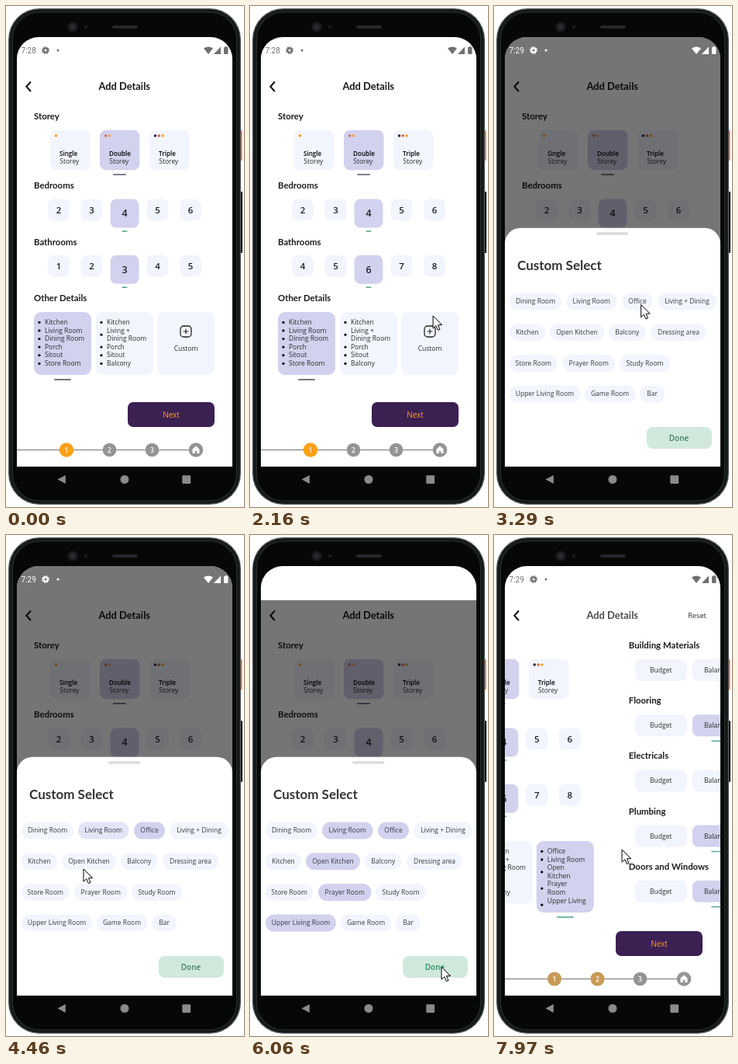
Write an HTML page with a canvas that moves like this. It is 307 by 645 pixels and loops after 8000 ms.

```html
<!DOCTYPE html>
<html lang="en">
<head>
<meta charset="utf-8">
<title>Add Details</title>
<style>
html, body { margin: 0; width: 100%; height: 100%; overflow: hidden; background: #fff; }
canvas { display: block; width: 307px; height: 645px; }
</style>
</head>
<body>
<canvas></canvas>
<script>
const LOOP = 8000;
const canvas = document.querySelector('canvas');
const ctx = canvas.getContext('2d');
const dpr = window.devicePixelRatio || 1;
canvas.width = 307 * dpr;
canvas.height = 645 * dpr;

const PALE = [242, 245, 253], LILAC = [210, 209, 238];
const ORANGE = [251, 160, 24], GRAY = [148, 148, 148];
const HEAD = '"Lato", sans-serif', BODY = '"Open Sans", sans-serif';

// Timing helpers
const clamp = v => Math.min(1, Math.max(0, v));
const lerp = (a, b, u) => a + (b - a) * u;
const smooth = u => u * u * (3 - 2 * u);
const mix = (a, b, u) => `rgb(${a.map((v, i) => Math.round(lerp(v, b[i], u)))})`;

function bezier(x1, y1, x2, y2) {
  const at = (s, a, b) => 3 * (1 - s) ** 2 * s * a + 3 * (1 - s) * s * s * b + s ** 3;
  return x => {
    let lo = 0, hi = 1;
    for (let i = 0; i < 20; i++) {
      const mid = (lo + hi) / 2;
      if (at(mid, x1, x2) < x) lo = mid; else hi = mid;
    }
    return at(hi, y1, y2);
  };
}
const decelerate = bezier(0, 0, .2, 1);
const ease = bezier(.25, .1, .25, 1);

// Keys are [time, ...values], eased between neighbours.
function track(keys, t) {
  if (t <= keys[0][0]) return keys[0].slice(1);
  const next = keys.findIndex(k => k[0] > t);
  if (next < 0) return keys[keys.length - 1].slice(1);
  const a = keys[next - 1], b = keys[next];
  const u = smooth((t - a[0]) / (b[0] - a[0]));
  return a.slice(1).map((v, i) => lerp(v, b[i + 1], u));
}

// Drawing helpers
function box(x, y, w, h, r, fill) {
  ctx.beginPath();
  ctx.roundRect(x, y, w, h, r);
  ctx.fillStyle = fill;
  ctx.fill();
}
function disc(x, y, r, fill) {
  ctx.beginPath();
  ctx.arc(x, y, r, 0, 7);
  ctx.fillStyle = fill;
  ctx.fill();
}
function shape(points, fill) {
  ctx.beginPath();
  points.forEach(p => ctx.lineTo(...p));
  ctx.closePath();
  ctx.fillStyle = fill;
  ctx.fill();
}
function line(points, color, width) {
  ctx.beginPath();
  points.forEach(p => ctx.lineTo(...p));
  ctx.strokeStyle = color;
  ctx.lineWidth = width;
  ctx.stroke();
}
function text(str, x, y, size = 8.5, { font = BODY, weight = 400, color = '#2b2b2b', align = 'left' } = {}) {
  ctx.font = `${weight} ${size}px ${font}`;
  ctx.textAlign = align;
  ctx.fillStyle = color;
  ctx.fillText(str, x, y);
}
const heading = (str, y) => text(str, 36, y, 11.4, { font: HEAD, weight: 700, color: '#1c1c1c' });
const underline = (cx, y, w, color) => box(cx - w / 2, y - .75, w, 1.5, .75, color);

function drawPhone() {
  box(300, 160, 4.5, 39, 1, '#e5663f');
  box(300, 239, 5, 79, 1, '#111');
  box(3, 3, 300, 639, 40, '#59605e');
  box(4.2, 4.2, 297.6, 636.6, 39, '#151918');
  box(8, 7.5, 290, 630, 35, '#2b302e');
  box(9, 8.5, 288, 628, 34, '#060707');
  disc(86, 27, 6.5, '#1b1c1e');
  disc(86, 27, 3, '#2b2c31');
  disc(103, 27, 2.5, '#161718');
  box(137, 25, 33, 4, 2, '#25282a');
  shape([[66.5, 609.5], [76.8, 604], [76.8, 615]], '#8a8a8a');
  disc(153, 609.5, 5.5, '#8a8a8a');
  box(227.3, 604.3, 10.8, 10.8, 1, '#8a8a8a');
}

function drawStatus(t, color) {
  text(t < 2500 ? '7:28' : '7:29', 19.5, 61, 10, { font: '"Roboto", sans-serif', color });
  ctx.strokeStyle = color;
  for (const [r, w, dash] of [[2.7, 2.2, []], [4.2, 1.4, [1.9, 1.4]]]) {
    ctx.beginPath();
    ctx.arc(51, 57, r, 0, 2 * Math.PI);
    ctx.lineWidth = w;
    ctx.setLineDash(dash);
    ctx.stroke();
  }
  ctx.setLineDash([]);
  disc(67, 57, 1.5, color);
  ctx.beginPath();
  ctx.moveTo(261, 62);
  ctx.lineTo(255, 54.5);
  ctx.quadraticCurveTo(261, 50.5, 267, 54.5);
  ctx.fillStyle = color;
  ctx.fill();
  shape([[268, 62], [277, 62], [277, 52.5]], color);
  box(281, 53, 5.5, 9, 1, color);
  box(282.6, 52, 2.3, 2, 0, color);
}

function drawStorey() {
  const options = [
    ['Single', 57, ['#f9a11b']],
    ['Double', 121, ['#c9705c', '#f0a24a']],
    ['Triple', 185, ['#35203f', '#d0673f', '#f9a11b']]
  ];
  heading('Storey', 146);
  for (const [name, x, dots] of options) {
    box(x, 159.7, 51.5, 51.5, 8, mix(PALE, LILAC, name === 'Double' ? 1 : 0));
    dots.forEach((c, i) => disc(x + 7.5 + i * 4.8, 167, 1.8, c));
    text(name, x + 12, 193, 8.1, { weight: 600, color: '#000' });
    text('Storey', x + 12.3, 203);
  }
  underline(146.5, 217, 17, '#55556e');
}

function drawPicker(top, first, last, center, active) {
  ctx.save();
  ctx.beginPath();
  ctx.rect(52, top - 4, 202, 50);
  ctx.clip();
  for (let n = first; n <= last; n++) {
    const w = clamp(1 - Math.abs(n - active));
    const x = 153 + 42.5 * (n - center), size = 28 + 9 * w;
    box(x - size / 2, top, size, size, 8, mix(PALE, LILAC, w));
    text(n, x, top + size / 2 + 4.2, 11.5 + w, { weight: 600, align: 'center', color: '#1e1e28' });
    if (w > 0) underline(x, top + size + 4.5, 7 * w, '#4f9e8d');
  }
  ctx.restore();
}

// Each item may wrap; its bullet sits beside the middle of its lines.
function drawList(x, items) {
  let y = 410;
  for (const lines of items) {
    disc(x + 7, y - 2.7 + (lines.length - 1) * 5.3, 1.6, '#000');
    for (const part of lines) {
      if (part) text(part, x + 14, y);
      y += 10.6;
    }
  }
}

function drawOther(customDone) {
  heading('Other Details', 380);
  box(36, 394, 74, 81, 9, mix(LILAC, PALE, customDone));
  box(116, 394, 74, 81, 9, mix(PALE, PALE, 0));
  box(195, 394, 74, customDone ? 92 : 81, 9, mix(PALE, LILAC, customDone));
  drawList(36, [['Kitchen'], ['Living Room'], ['Dining Room'], ['Porch'], ['Sitout'], ['Store Room']]);
  drawList(116, [['Kitchen'], ['Living +', 'Dining Room'], ['Porch'], ['Sitout'], ['Balcony']]);
  if (customDone) {
    drawList(195, [['Office'], ['Living Room'], ['Open', 'Kitchen'], ['Prayer', 'Room'], ['Upper Living', '']]);
    underline(232, 492, 22, '#4aa37f');
  } else {
    ctx.beginPath();
    ctx.roundRect(225, 412, 14, 14, 4);
    ctx.strokeStyle = '#222';
    ctx.lineWidth = 1.3;
    ctx.stroke();
    line([[228.7, 419], [235.3, 419]], '#222', 1.2);
    line([[232, 415.7], [232, 422.3]], '#222', 1.2);
    text('Custom', 232, 444, 8.5, { align: 'center' });
    underline(73, 481, 22, '#4b4b55');
  }
}

function drawMaterials() {
  const rows = ['Building Materials', 'Flooring', 'Electricals', 'Plumbing', 'Doors and Windows'];
  rows.forEach((name, i) => {
    const y = 160 + i * 71.2, balanced = i === 1 || i > 2;
    heading(name, y - 14);
    box(44, y, 67, 28, 8, mix(PALE, PALE, 0));
    box(118, y, 67, 28, 8, mix(PALE, LILAC, balanced ? 1 : 0));
    text('Budget', 77.5, y + 17, 8.5, { align: 'center' });
    text('Balanced', 151.5, y + 17, 8.5, { align: 'center' });
    if (balanced) underline(151.5, y + 34, 18, '#5fa5a0');
  });
}

function drawFooter(slide) {
  box(157, 510, 112, 32, 7, '#3b2052');
  text('Next', 213, 530, 10, { align: 'center', color: '#f9a11b' });
  line([[14, 571.5], [245, 571.5]], '#929292', 1.4);
  [[78, 1 - slide], [133.5, slide], [188.5, 0]].forEach(([x, on], i) => {
    disc(x, 571.5, 8.8 + .5 * on, mix(GRAY, ORANGE, on));
    text(i + 1, x, 574.6, 8.5, { weight: 600, align: 'center', color: '#fff' });
  });
  disc(245, 571.5, 9.3, mix(GRAY, GRAY, 0));
  shape([[245, 566.5], [249.5, 570.5], [249.5, 576], [246.3, 576], [246.3, 573],
    [243.7, 573], [243.7, 576], [240.5, 576], [240.5, 570.5]], '#fff');
}

function drawPage(t) {
  const slide = smooth(clamp((t - 7800) / 340));
  const [center] = track([[950, 3], [1350, 4], [1420, 4], [1700, 6]], t);
  const [active] = track([[1150, 3], [1380, 3.5], [1440, 4], [1700, 6]], t);

  line([[32, 97.5], [26.3, 103.7], [32, 110]], '#111', 2);
  text('Add Details', 152.7, 108, 12.9, { font: HEAD, weight: 700, align: 'center', color: mix([24, 24, 24], [130, 130, 130], slide) });
  if (slide > 0) {
    ctx.globalAlpha = clamp(slide * 2);
    text('Reset', 262, 107, 9.2, { align: 'center' });
    ctx.globalAlpha = 1;
  }
  ctx.save();
  ctx.translate(-278 * slide, 0);
  drawStorey();
  heading('Bedrooms', 235);
  drawPicker(248.5, 2, 6, 4, 4);
  heading('Bathrooms', 307.5);
  drawPicker(320.8, 1, 8, center, active);
  drawOther(t >= 6350 ? 1 : 0);
  if (slide > 0) {
    ctx.translate(278, 0);
    drawMaterials();
  }
  ctx.restore();
  drawFooter(slide);
}

// Chips: name, left, width and, when chosen, the time of the click.
const chipRows = [
  [['Dining Room', 20, 67], ['Living Room', 93, 65.5, 4350], ['Office', 165, 40, 3600], ['Living + Dining', 211, 76]],
  [['Kitchen', 20, 46], ['Open Kitchen', 72, 70, 4620], ['Balcony', 148, 47.5], ['Dressing area', 202, 72]],
  [['Store Room', 20, 61.5], ['Prayer Room', 88, 68.5, 5100], ['Study Room', 162, 65]],
  [['Upper Living Room', 20, 91, 5380], ['Game Room', 117, 65], ['Bar', 188, 32]]
];

function drawSheet(t, top) {
  box(14, top + .8, 278, 330, [20, 20, 0, 0], '#fff');
  box(132, top + 6.2, 41.5, 3.6, 1.8, '#dcdcdf');
  text('Custom Select', 30, top + 54.5, 17, { font: HEAD, weight: 700, color: '#333' });
  chipRows.forEach((row, i) => {
    const y = top + 84.5 + i * 39.7;
    for (const [name, x, w, clicked = Infinity] of row) {
      box(x, y, w, 22, 11, mix(PALE, LILAC, clamp((t - clicked) / 240)));
      text(name, x + w / 2, y + 13.8, 8.5, { align: 'center', color: '#3a3a40' });
    }
  });
  box(197, top + 257, 84, 28, 8, '#d1e9dc');
  text('Done', 238.5, top + 274.7, 10, { weight: 600, align: 'center', color: t > 5900 ? '#27935f' : '#3f7f62' });
}

const cursorPath = [
  [50, 281, 647], [870, 187, 338], [1080, 187, 338], [1340, 233, 337], [1900, 233, 337],
  [2350, 238, 437], [2750, 238, 437], [3480, 180, 374], [3850, 180, 374], [4200, 132, 382],
  [4340, 130, 383], [4460, 100, 430], [4700, 100, 429], [5000, 117, 465], [5190, 117, 467],
  [5330, 79, 497], [5480, 79, 497], [5980, 247, 556], [6370, 247, 556], [6540, 223, 493],
  [6750, 223, 493], [7010, 220, 445], [7150, 220, 445], [7350, 182, 516], [7520, 176, 523],
  [7680, 176, 523], [7960, 165, 405]
];

function drawCursor(t) {
  const [x, y] = track(cursorPath, t);
  const outline = [[0, 0], [0, 16.2], [3.8, 12.7], [6.3, 18.5], [8.9, 17.4], [6.5, 11.8], [11.6, 11.6]]
    .map(([dx, dy]) => [x + dx, y + dy]);
  shape(outline, '#fff');
  ctx.strokeStyle = '#000';
  ctx.lineWidth = 1;
  ctx.stroke();
}

function draw(t) {
  ctx.setTransform(dpr, 0, 0, dpr, 0, 0);
  ctx.fillStyle = '#fff';
  ctx.fillRect(0, 0, 307, 645);
  drawPhone();

  const open = t < 6350 ? clamp((t - 2620) / 266) : 1 - clamp((t - 6350) / 200);
  ctx.save();
  ctx.beginPath();
  ctx.roundRect(14, 40, 278, 553, [28, 28, 0, 0]);
  ctx.clip();
  ctx.fillStyle = '#fff';
  ctx.fillRect(14, 40, 278, 553);
  drawPage(t);
  if (open > 0) {
    const dimTop = t < 5900 ? 40 : 84;
    ctx.fillStyle = `rgba(0,0,0,${.54 * ease(open)})`;
    ctx.fillRect(14, dimTop, 278, 593 - dimTop);
    drawSheet(t, 593 - 308 * decelerate(open));
  }
  drawStatus(t, open > 0 ? '#fff' : '#707070');
  ctx.restore();
  drawCursor(t);
}

function frame() {
  draw(performance.now() % LOOP);
  requestAnimationFrame(frame);
}
frame();
</script>
</body>
</html>
```
